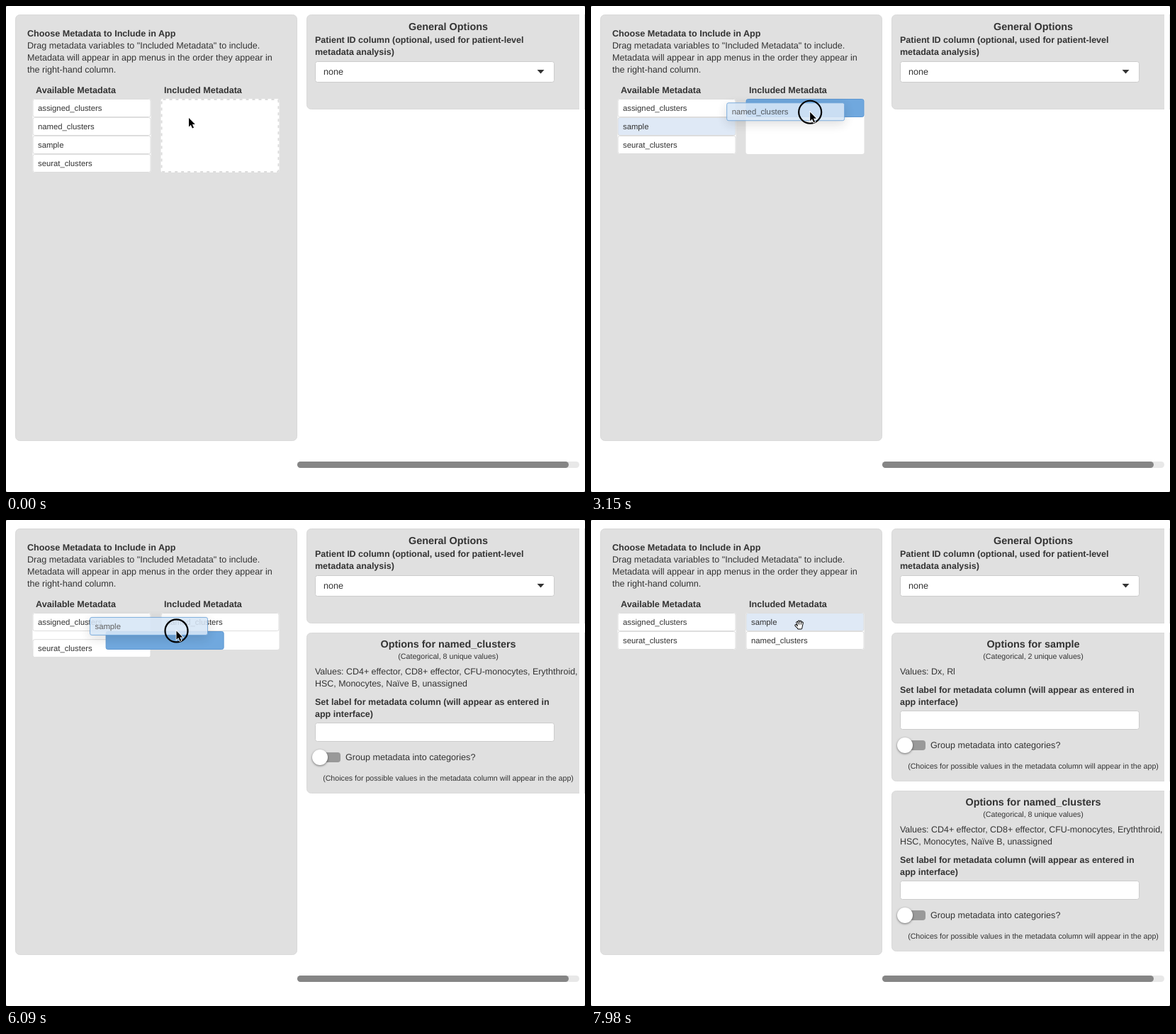
Animation, 817 px wide and 686 px high, one loop 8000 ms. Source, as an HTML page:

```html
<!DOCTYPE html>
<html lang="en">
<head>
<meta charset="utf-8">
<title>Choose metadata</title>
<style>
html, body { margin: 0; width: 100%; height: 100%; overflow: hidden; background: #777; }
svg { display: block; width: 817px; height: 686px; }
text { font: 12.6px "Liberation Sans", Arial, sans-serif; fill: #333; text-rendering: geometricPrecision; }
.b { font-weight: bold; }
.label { font-weight: bold; font-size: 12.5px; }
.title { font-weight: bold; font-size: 14.4px; text-anchor: middle; }
.values { font-size: 12.45px; }
.note { font-size: 10.65px; text-anchor: middle; }
.item { font-size: 11.3px; }
.panel { fill: #e0e0e0; stroke: #d9d9d9; }
.field { fill: #fff; stroke: #ccc; }
.row { fill: #fff; stroke: #ddd; }
.hover { fill: #dfe9f6; stroke: #ddd; }
.ghost { fill: #70a8de; stroke: #5f98d2; }
.drag { opacity: .88; filter: drop-shadow(0 4px 8px rgba(0, 0, 0, .16)); }
.drag rect { fill: #d7e6f6; stroke: #6ea3d8; }
.drag text { fill: #4a4a4a; }
.knob { fill: #fff; filter: drop-shadow(0 1px 1.5px rgba(0, 0, 0, .5)); }
</style>
</head>
<body>
<svg viewBox="0 0 817 686">
  <rect width="817" height="686" rx="2" fill="#fff"/>
  <g id="base"></g>
  <g id="options"></g>
  <rect x="809" y="8" width="7" height="610" fill="#fff"/>
  <g id="lists"></g>
</svg>
<script>
const LOOP = 8000, STEP = 70, SLIDE = 150;
const LEFT = 37.5, RIGHT = 218.5, TOP = 131, ROW = 26;
const PRESS1 = 1890, INSERT1 = 2690, DROP1 = 4060, PANEL1 = 4130;
const PRESS2 = 5740, INSERT2 = 6008, SWAP = 6250, DROP2 = 7630, PANEL2 = 7700;

const $ = id => document.getElementById(id);
const text = (x, y, s, cls = '') => `<text x="${x}" y="${y}" class="${cls}">${s}</text>`;
const rect = (x, y, w, h, rx, attrs) =>
  `<rect x="${x}" y="${y}" width="${w}" height="${h}" rx="${rx}" ${attrs}/>`;
const panel = (x, y, w, h) => rect(x + .5, y + .5, w - 1, h - 1, 6, 'class="panel"');
const rowY = i => TOP + ROW * i;

const smooth = p => p * p * (3 - 2 * p);
const easeOut = p => 1 - (1 - p) ** 3;
const clamp = p => Math.max(0, Math.min(1, p));
const slide = (t, start, a, b) => a + (b - a) * smooth(clamp((t - start) / SLIDE));

$('base').innerHTML =
  panel(13, 12, 398, 602) + panel(424, 12, 400, 134) +
  text(30, 43, 'Choose Metadata to Include in App', 'b') +
  text(30, 60, 'Drag metadata variables to "Included Metadata" to include.') +
  text(30, 77, 'Metadata will appear in app menus in the order they appear in') +
  text(30, 94, 'the right-hand column.') +
  text(42, 123, 'Available Metadata', 'b') + text(223, 123, 'Included Metadata', 'b') +
  text(624, 34, 'General Options', 'title') +
  text(436, 52, 'Patient ID column (optional, used for patient-level', 'label') +
  text(436, 69, 'metadata analysis)', 'label') +
  rect(436.5, 78.5, 337, 29, 3, 'class="field"') + text(448, 97, 'none') +
  '<path d="M749.5 90h10l-5 5.5z" fill="#333"/>' +
  rect(411, 643, 398, 9, 4.5, 'fill="#e8e8e8"') + rect(411, 643, 383, 9, 4.5, 'fill="#858585"');

function optionPanel(y, name, count, values) {
  const d = y + 17 * (values.length - 2);
  return panel(424, y, 400, d - y + 227) +
    text(624, y + 21, `Options for ${name}`, 'title') +
    text(624, y + 37, `(Categorical, ${count} unique values)`, 'note') +
    values.map((v, i) => text(436, y + 59 + 17 * i, v, 'values')).join('') +
    text(436, d + 102, 'Set label for metadata column (will appear as entered in', 'label') +
    text(436, d + 119, 'app interface)', 'label') +
    rect(436.5, d + 127.5, 337, 26, 3, 'class="field"') +
    rect(437, d + 169, 35, 14, 4, 'fill="#999"') +
    `<circle cx="443" cy="${d + 176}" r="11" class="knob"/>` +
    text(479, d + 180, 'Group metadata into categories?') +
    text(624, d + 208.5, '(Choices for possible values in the metadata column will appear in the app)', 'note');
}

const clusterPanel = y => optionPanel(y, 'named_clusters', 8,
  ['Values: CD4+ effector, CD8+ effector, CFU-monocytes, Eryththroid,',
   'HSC, Monocytes, Naïve B, unassigned']);

function options(t) {
  if (t < PANEL1) return '';
  if (t < PANEL2) return clusterPanel(159);
  return optionPanel(159, 'sample', 2, ['Values: Dx, Rl']) + clusterPanel(382);
}

// time, x, y, easing towards this point
const path = [
  [0, 258, 158], [560, 215, 153], [770, 215, 153], [1610, 154, 171],
  [1820, 154, 171], [2380, 206, 163], [2520, 206, 163], [3290, 319, 148.5],
  [3500, 319, 148.5], [3640, 319.5, 149], [3710, 319.5, 149], [3780, 320, 149],
  [4620, 320, 149], [5180, 160, 177], [5670, 160, 177], [6510, 252, 153.5, easeOut],
  [6650, 252, 153.5], [7350, 295, 147], [7910, 295, 147], [7980, 294, 148]
];

function pointer(t) {
  const i = path.findIndex(k => k[0] > t);
  if (i < 0) return path.at(-1).slice(1, 3);
  const [t0, x0, y0] = path[i - 1], [t1, x1, y1, ease = smooth] = path[i];
  const p = ease((t - t0) / (t1 - t0));
  return [x0 + (x1 - x0) * p, y0 + (y1 - y0) * p];
}

const box = (x, y, cls) => rect(x + .5, y + .5, 166, 25, 2.5, `class="${cls}"`);
const item = (name, x, y, hover) =>
  box(x, y, hover ? 'hover' : 'row') + text(x + 7.5, y + 17, name, 'item');
const list = (x, rows) => rect(x, TOP, 167, ROW * rows, 3, 'fill="#fff"');
const dragged = (name, x, y) => `<g class="drag">${item(name, x, y)}</g>`;

const arrow = '<path d="M0 0V12.4L2.8 9.8L4.9 14.6L7 13.7L4.9 9H8.8Z" stroke="#fff" stroke-width="1.6" paint-order="stroke"/>';
const fingers = 'M-3.4-3.6L-1.6 1M-.8-5.2L0 0M2-5L1.8 0M4.6-3.2L3.6 1M-5.4 .8L-2.2 4M-1.6 1H3.6L2.8 5.2H-1.6Z';
const hand = ['#000" stroke-width="3.6', '#fff" stroke-width="1.5'].map(s =>
  `<path d="${fingers}" transform="scale(.92)" fill="#fff" stroke="${s}" stroke-linecap="round" stroke-linejoin="round"/>`).join('');

function lists(t) {
  const [x, y] = pointer(t);
  const drag1 = t >= PRESS1 && t < DROP1, drag2 = t >= PRESS2 && t < DROP2;
  const rows = t < INSERT1 ? 4 : t < INSERT2 ? 3 : 2;
  const onRight = t >= DROP1 && !drag2 && x > 219;
  const onSample = t >= DROP1 && t < PRESS2 && x < 204;

  let out = list(LEFT, rows) + list(RIGHT, rows);
  if (t < INSERT1)
    out += `<rect x="219.5" y="132" width="165" height="102" rx="2" fill="none" stroke="#dcdcdc" stroke-width="2" stroke-dasharray="4 5"/>`;

  out += item('assigned_clusters', LEFT, TOP);
  const up1 = slide(t, INSERT1, 0, 1), up2 = slide(t, INSERT2, 0, 1);
  out += item('seurat_clusters', LEFT, rowY(3 - up1 - up2), drag2 && t > INSERT2 + SLIDE);

  const clusterX = slide(t, INSERT1, LEFT, RIGHT);
  const clusterY = t < SWAP ? rowY(1 - up1) : slide(t, SWAP, TOP, rowY(1));
  if (!drag1) out += item('named_clusters', clusterX, clusterY, onRight && t < PRESS2);

  const sampleX = slide(t, INSERT2, LEFT, RIGHT);
  const sampleY = t < SWAP ? rowY(2 - up1) : slide(t, SWAP, rowY(1), TOP);
  out += drag2 ? box(sampleX, sampleY, 'ghost')
    : item('sample', sampleX, sampleY, onSample || t >= DROP2 || drag1 && t > INSERT1 + SLIDE);

  if (drag1) out += box(clusterX, clusterY, 'ghost') + dragged('named_clusters', x - 118, y - 13.5);
  if (drag2) out += dragged('sample', x - 122.5, y - 19.5);
  if (drag1 || drag2)
    out += `<circle cx="${x}" cy="${y}" r="16" fill="none" stroke="#000" stroke-width="2.2"/>`;
  return out + `<g transform="translate(${x} ${y})">${onRight || onSample ? hand : arrow}</g>`;
}

let shown = -1;
function frame(now) {
  const t = Math.floor(now % LOOP / STEP) * STEP;
  if (t !== shown) {
    shown = t;
    $('options').innerHTML = options(t);
    $('lists').innerHTML = lists(t);
  }
  requestAnimationFrame(frame);
}
frame(0);
</script>
</body>
</html>
```
